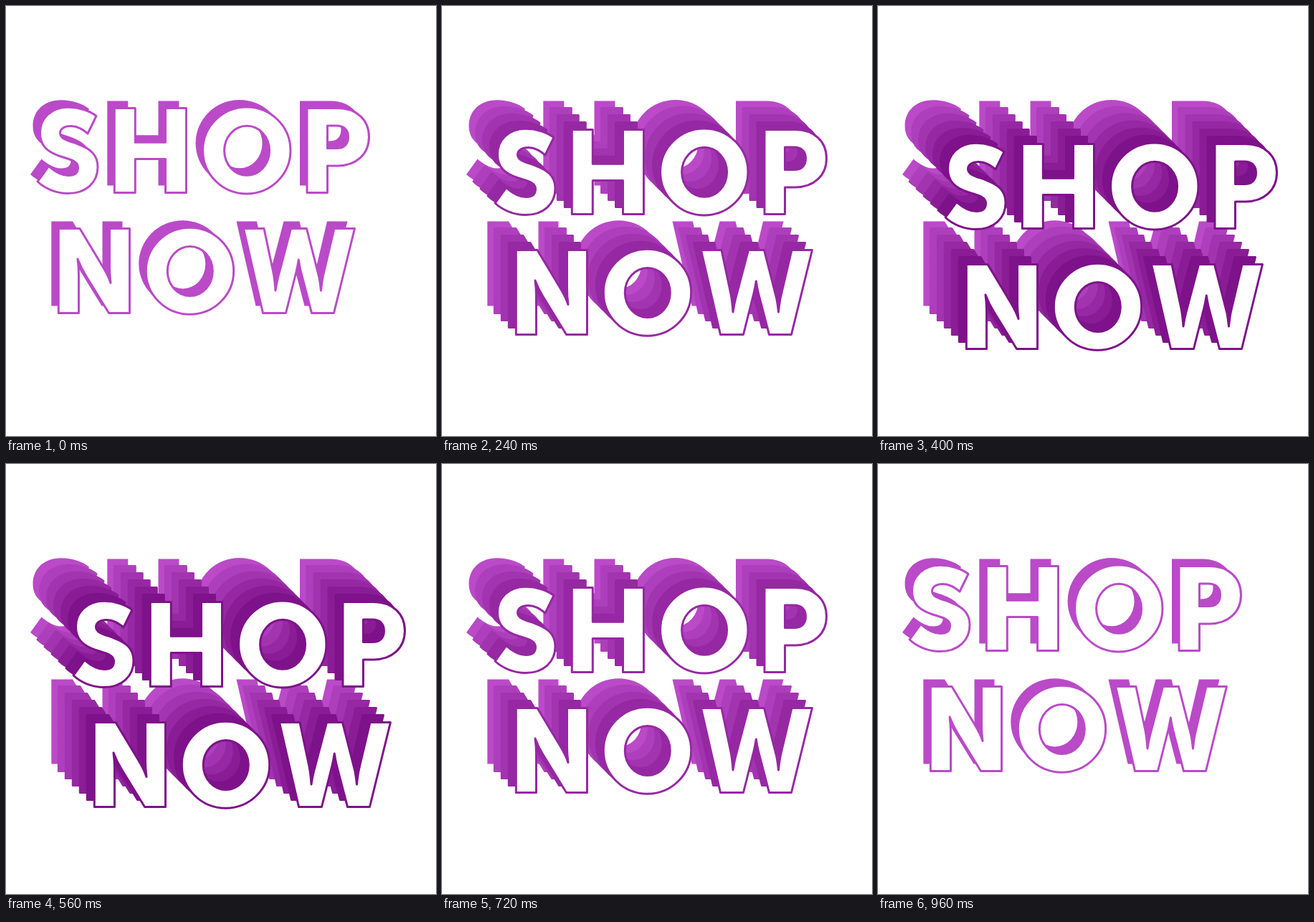
Animation of 600 by 600 pixels, one loop 1040 ms. Source, as an HTML page with a canvas:

```html
<!DOCTYPE html>
<html lang="en">
<head>
<meta charset="utf-8">
<title>SHOP NOW</title>
<style>
  html, body { margin: 0; height: 100%; overflow: hidden; background: #fff; }
  canvas { display: block; }
</style>
</head>
<body>
<canvas id="stage" width="600" height="600" role="img" aria-label="SHOP NOW"></canvas>
<script>
const ctx = document.getElementById('stage').getContext('2d');
const FRAME = 80, LOOP = 1040, STEP = 10, DEPTH = 6;

const oval = (cx, cy, rx, ry) =>
  `M${cx - rx} ${cy}a${rx} ${ry} 0 1 1 ${2 * rx} 0a${rx} ${ry} 0 1 1 ${-2 * rx} 0Z`;
const ring = (cx, cy) => oval(cx, cy, 61.2, 60.5) + oval(cx + .3, cy + .3, 31.5, 34.5);

const letters = {
  S: `M126 153.5L114 178C107 172.5 100 167.5 90.5 167.5C81 167.5 75.5 171.5 75.5 177.5
      C75.5 186 88 188 101 193C117 199 128 207 128 224.5C128 246 112 261.5 86.5 261.5
      C70 261.5 54 254.5 44 245L59.5 223.5C66 229 76 236.5 87 236.5
      C97 236.5 100.5 232 100.5 225.5C100.5 215.5 88 214 75 209.5
      C59 204 47.5 196 47.5 177C47.5 157 62.5 141.3 87 141.3C102.5 141.3 117 146.5 126 153.5Z`,
  H: 'M151.3 142.5H180.3V190.3H222.5V142.5H251.5V260.5H222.5V213.5H180.3V260.5H151.3Z',
  O: ring(335.8, 201.5),
  P: `M420 142.5H463C489 142.5 506.5 159 506.5 182.7S489 222.9 463 222.9H448.5V260.5H420Z
      M448.5 167H461C472 167 477.5 173 477.5 182.8S472 198.6 461 198.6H448.5Z`,
  N: `M73.3 310.5H103L135.5 364.5C140 372 143.5 379 146 386.5C145 379 144.5 372 144.5 364
      V310.5H172.5V428.5H143.5L111 375.5C106.5 368 103 361 100 353
      C101 360 101.5 367 101.5 375V428.5H73.3Z`,
  O2: ring(256.5, 369.7),
  W: `M331.5 310.5H360L373 372Q375 382 376 397Q377.5 387 379.5 379L397.5 310.5H419.5
      L437 379Q438.5 387 439.5 397Q441 382 443.5 372L458 310.5H486.5L457.5 428.5H426.5
      L411.5 371Q409.5 363 408.3 354Q407 363 405 371L390.5 428.5H358.5Z`
};
const word = new Path2D(Object.values(letters).join(''));

const shade = i => `rgb(${186 - 12 * i},${74 - 11.2 * i},${200 - 12.4 * i})`;

function paint(fill, outline) {
  ctx.fillStyle = fill;
  ctx.fill(word, 'evenodd');
  if (!outline) return;
  ctx.strokeStyle = outline;
  ctx.stroke(word);
}

function draw(steps) {
  ctx.clearRect(0, 0, 600, 600);
  ctx.save();
  ctx.lineWidth = 3;
  ctx.lineJoin = 'round';
  ctx.translate(-STEP, -STEP);
  for (let i = 0; i < steps; i++) {
    paint(shade(i), i > 0 && shade(i)); // the rearmost layer has no outline
    ctx.translate(STEP, STEP);
  }
  paint('#fff', shade(steps - 1));
  ctx.restore();
}

// The depth grows, holds at its limit, then shrinks again.
function tick() {
  const i = Math.floor(performance.now() % LOOP / FRAME);
  draw(Math.min(DEPTH, i + 1, LOOP / FRAME - i));
  requestAnimationFrame(tick);
}
tick();
</script>
</body>
</html>
```
